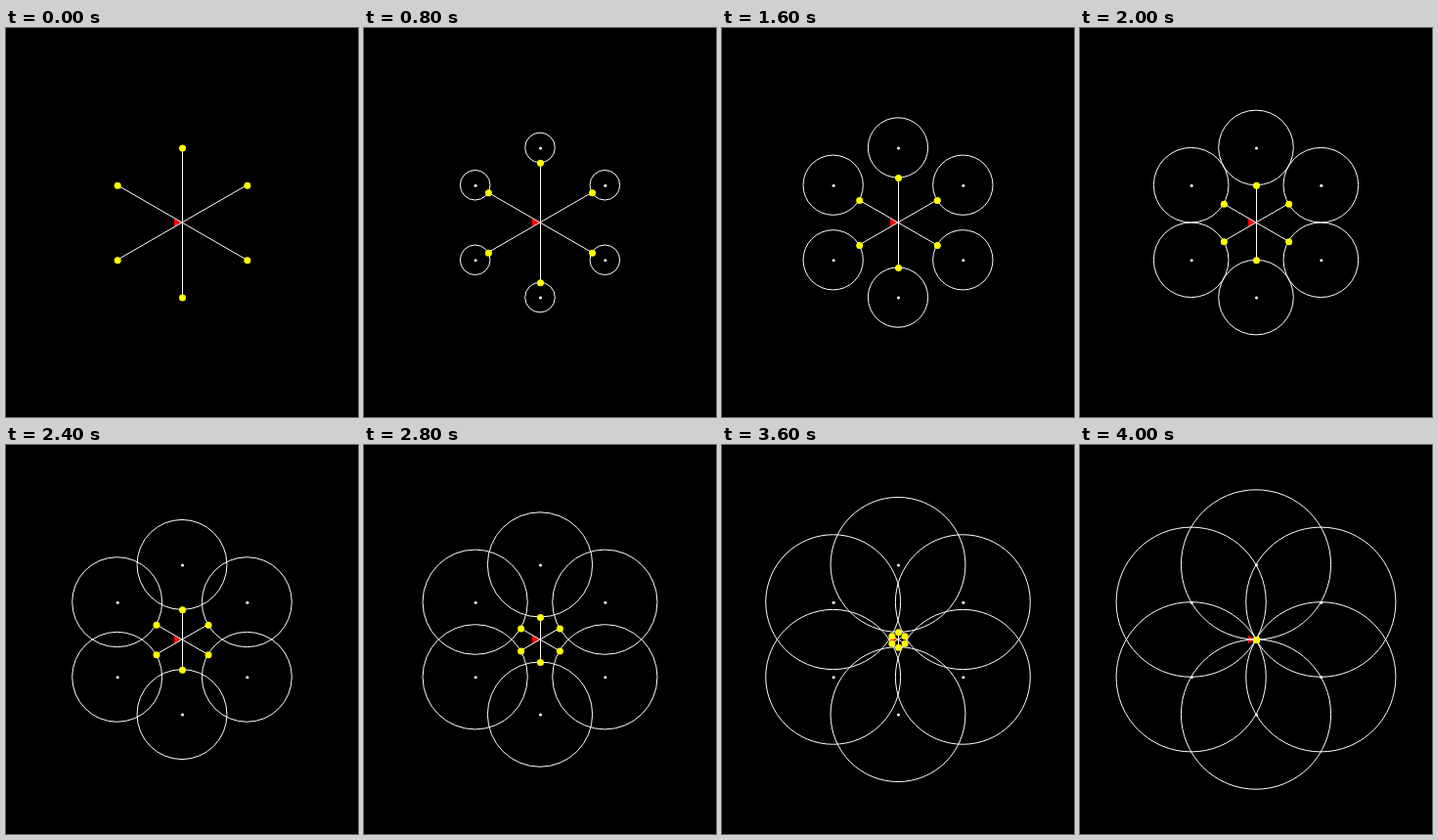
An HTML page with a canvas for the animation above (4.1 s loop, 360 px wide and 398 px high).

```html
<!DOCTYPE html>
<html lang="en">
<head>
<meta charset="utf-8">
<title>Six circles</title>
<style>
html, body { margin: 0; width: 100%; height: 100%; overflow: hidden; background: #000; }
canvas { display: block; }
</style>
</head>
<body>
<canvas id="stage" width="360" height="398"></canvas>
<script>
const ctx = document.getElementById('stage').getContext('2d');
const CX = 180, CY = 199, R = 76.6;
const STEP = 100, STEPS = 41;
const angles = Array.from({ length: 6 }, (_, i) => Math.PI / 6 + i * Math.PI / 3);

const at = (angle, dist) => [CX + dist * Math.cos(angle), CY + dist * Math.sin(angle)];

function dot([x, y], radius, color) {
  ctx.fillStyle = color;
  ctx.beginPath();
  ctx.arc(x + 0.5, y + 0.5, radius, 0, Math.PI * 2);
  ctx.fill();
}

function arrow() {
  ctx.fillStyle = '#f00';
  ctx.beginPath();
  ctx.moveTo(CX, CY);
  ctx.lineTo(CX - 8, CY - 4);
  ctx.lineTo(CX - 8, CY + 4);
  ctx.fill();
}

function draw(step) {
  const r = R * step / (STEPS - 1);
  ctx.fillStyle = '#000';
  ctx.fillRect(0, 0, 360, 398);
  arrow();

  ctx.strokeStyle = '#fff';
  ctx.lineWidth = 1;
  for (const a of angles) {
    const [x, y] = at(a, R);
    const [px, py] = at(a, R - r);
    const shift = Math.abs(Math.cos(a)) < 0.01 ? 0.5 : 0; // keeps the upright line sharp
    ctx.beginPath();
    ctx.moveTo(CX + shift, CY);
    ctx.lineTo(px + shift, py);
    ctx.stroke();
    if (step > 0) {
      ctx.beginPath();
      ctx.arc(x, y, r, 0, Math.PI * 2);
      ctx.stroke();
    }
    dot([x, y], 1.5, '#fff');
  }
  for (const a of angles) dot(at(a, R - r), 3.5, '#ff0');
}

const start = performance.now();
let last = -1;
function tick() {
  const step = Math.floor((performance.now() - start) / STEP) % STEPS;
  if (step !== last) draw(last = step);
  requestAnimationFrame(tick);
}
tick();
</script>
</body>
</html>
```
